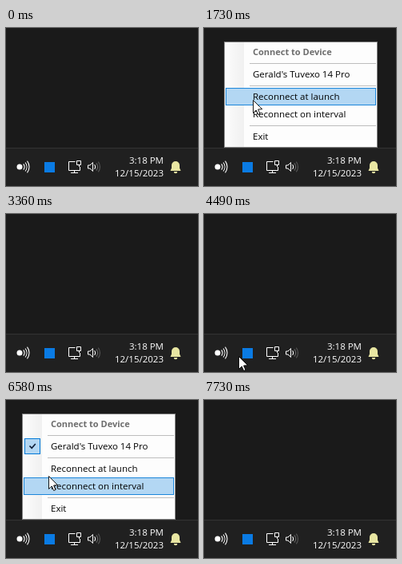
Recreate the animation shown at these times as an HTML page with a canvas. Size 240x198 px, loop 8060 ms.

```html
<!DOCTYPE html>
<html lang="en">
<head>
<meta charset="utf-8">
<title>Tray menu</title>
<style>
  html, body { margin: 0; width: 100%; height: 100%; overflow: hidden; background: #1a1a1a; }
  canvas { display: block; }
</style>
</head>
<body>
<canvas id="stage" width="240" height="198"></canvas>
<script>
const ctx = document.getElementById('stage').getContext('2d');
const LOOP = 8060;
const FONT = '"Open Sans", "Noto Sans", sans-serif';
const MENU = { top: 17, width: 192, height: 133, row: 22, gap: 6 };
const FADE_IN = 60, FADE_OUT = 180, HOVER_LAG = 25;

const pt = (x, y) => ({ x, y });
const OUTSIDE = pt(-14, 150);
const TRAY_A = pt(25, 171), TRAY_B = pt(20, 175);
const PICK_A = pt(72, 49), PICK_B = pt(70, 55);

// Eased pointer strokes, bent towards `via`; the pointer rests in between
const STROKES = [
  { start: 240, end: 610, from: OUTSIDE, to: TRAY_A },
  { start: 1300, end: 2120, from: TRAY_A, via: pt(70, 79), to: PICK_A },
  { start: 2580, end: 3360, from: PICK_A, via: pt(30, 66), to: pt(-14, 38) },
  { start: 3910, end: 4730, from: OUTSIDE, via: pt(96, 188), to: TRAY_B },
  { start: 6240, end: 7060, from: TRAY_B, via: pt(76, 40), to: PICK_B },
  { start: 7270, end: 7730, from: PICK_B, to: pt(-14, 58) }
];

const SESSIONS = [
  { x: TRAY_A.x, open: 1030, close: 2120, checked: false },
  { x: TRAY_B.x, open: 5180, close: 7060, checked: true }
];

const HEADER = 'Connect to Device';
const DEVICE = "Gerald's Tuvexo 14 Pro";
const SEPARATOR = null;
const ITEMS = [HEADER, SEPARATOR, DEVICE, SEPARATOR,
  'Reconnect at launch', 'Reconnect on interval', SEPARATOR, 'Exit'];

const ICONS = {
  monitor: new Path2D('M86.5 167.5H78.5V178.5H92.5V174M81 181.5H90M85.5 179V181M88.5 166.5h5v5h-5zM91.5 172v2'),
  speaker: new Path2D('M102.5 172H105L108.5 168.5V179.5L105 176H102.5z'),
  bell: new Path2D('M205.5 179L207 175.5V172a5 5 0 0 1 10 0V175.5L218.5 179zM209.8 180h4.4a2.2 2.2 0 0 1-4.4 0z'),
  arrow: new Path2D('M.5 .5V16.5L4.2 13L6.7 18.5L9 17.5L6.6 12L11.7 11.7z')
};

const clamp = v => Math.max(0, Math.min(1, v));
const mix = (a, b, s) => pt(a.x + (b.x - a.x) * s, a.y + (b.y - a.y) * s);

function pointerAt(t) {
  const stroke = STROKES.findLast(s => s.start <= t) || STROKES[0];
  const { start, end, from, to, via = mix(from, to, 0.5) } = stroke;
  const u = clamp((t - start) / (end - start));
  const s = u * u * (3 - 2 * u);
  const p = mix(mix(from, via, s), mix(via, to, s), s);
  return pt(Math.round(p.x), Math.round(p.y));
}

function rect(x, y, w, h, fill) {
  ctx.fillStyle = fill;
  ctx.fillRect(x, y, w, h);
}

function box(x, y, w, h, fill, border) {
  rect(x, y, w, h, border);
  rect(x + 1, y + 1, w - 2, h - 2, fill);
}

function stroke(path, color, width = 1) {
  ctx.strokeStyle = color;
  ctx.lineWidth = width;
  ctx.stroke(path);
}

function waves(x, y, radius, step, colors) {
  colors.forEach((color, i) => {
    const path = new Path2D();
    path.arc(x, y, radius + i * step, -0.66, 0.66);
    stroke(path, color, 1.1);
  });
}

function label(text, x, y, color, { size = 11.5, align = 'left', weight = 400 } = {}) {
  ctx.font = `${weight} ${size}px ${FONT}`;
  ctx.textAlign = align;
  ctx.fillStyle = color;
  ctx.fillText(text, x, y);
}

function drawTaskbar(tip) {
  rect(0, 150, 240, 48, '#202020');
  rect(0, 150, 240, 1, '#333');

  const button = new Path2D();
  button.roundRect(9, 154, 28, 40, 4);
  if (ctx.isPointInPath(button, tip.x, tip.y)) {
    ctx.fillStyle = 'rgba(255,255,255,0.06)';
    ctx.fill(button);
  }

  const dot = new Path2D();
  dot.arc(17, 174, 3.5, 0, 2 * Math.PI);
  ctx.fillStyle = '#fff';
  ctx.fill(dot);
  waves(17, 174, 6, 3, ['#fff', '#fff', '#fff']);

  rect(48, 168, 13, 13, '#0a7be4');
  stroke(ICONS.monitor, '#fff');
  stroke(ICONS.speaker, '#fff');
  waves(107, 174, 4.5, 3, ['#fff', '#666', '#555']);

  const clock = { align: 'right', weight: 500 };
  label('3:18 PM', 197, 170, '#fff', clock);
  label('12/15/2023', 197, 186, '#fff', clock);
  ctx.fillStyle = '#e8e6a2';
  ctx.fill(ICONS.bell);
}

function drawCheck(x, y) {
  box(x, y, 20, 20, '#b3d7f3', '#0078d7');
  stroke(new Path2D(`M${x + 6.5} ${y + 9.5}l2.7 2.8l4.6-5.3`), '#0b1a33', 1.6);
}

function drawItem(text, x, y, tip, checked) {
  const header = text === HEADER;
  const hot = !header && tip.x >= x && tip.y >= y && tip.y < y + MENU.row;
  if (hot) box(x + 2, y, MENU.width - 4, MENU.row, '#b3d7f3', '#1c86da');
  if (checked && text === DEVICE) drawCheck(x + 3, y + 1);
  if (header) label(text, x + 36, y + 15, '#6d6d6d', { size: 11, weight: 700 });
  else label(text, x + 36, y + 15, '#000');
}

function drawMenu({ x, open, close, checked }, t, tip) {
  const { top, width, height, row, gap } = MENU;
  ctx.globalAlpha = clamp((t - open) / FADE_IN) * clamp(1 - (t - close) / FADE_OUT);
  box(x, top, width, height, '#fdfdfd', '#808080');

  const gutter = ctx.createLinearGradient(x + 1, 0, x + 25, 0);
  gutter.addColorStop(0, '#fcfcfc');
  gutter.addColorStop(1, '#f0f0f0');
  rect(x + 1, top + 1, 24, height - 2, gutter);

  let y = top + 2;
  for (const text of ITEMS) {
    if (text === SEPARATOR) rect(x + 32, y + gap / 2, width - 34, 1, '#bdbdbd');
    else drawItem(text, x, y, tip, checked);
    y += text === SEPARATOR ? gap : row;
  }
  ctx.globalAlpha = 1;
}

function drawPointer({ x, y }) {
  ctx.save();
  ctx.translate(x, y);
  ctx.fillStyle = '#fff';
  ctx.fill(ICONS.arrow);
  stroke(ICONS.arrow, '#000', 0.9);
  ctx.restore();
}

function draw(t) {
  const tip = pointerAt(t);
  rect(0, 0, 240, 198, '#1a1a1a');
  drawTaskbar(tip);
  SESSIONS.forEach(session => drawMenu(session, t, pointerAt(t - HOVER_LAG)));
  drawPointer(tip);
}

const begin = performance.now();
function tick() {
  draw((performance.now() - begin) % LOOP);
  requestAnimationFrame(tick);
}
tick();
</script>
</body>
</html>
```
